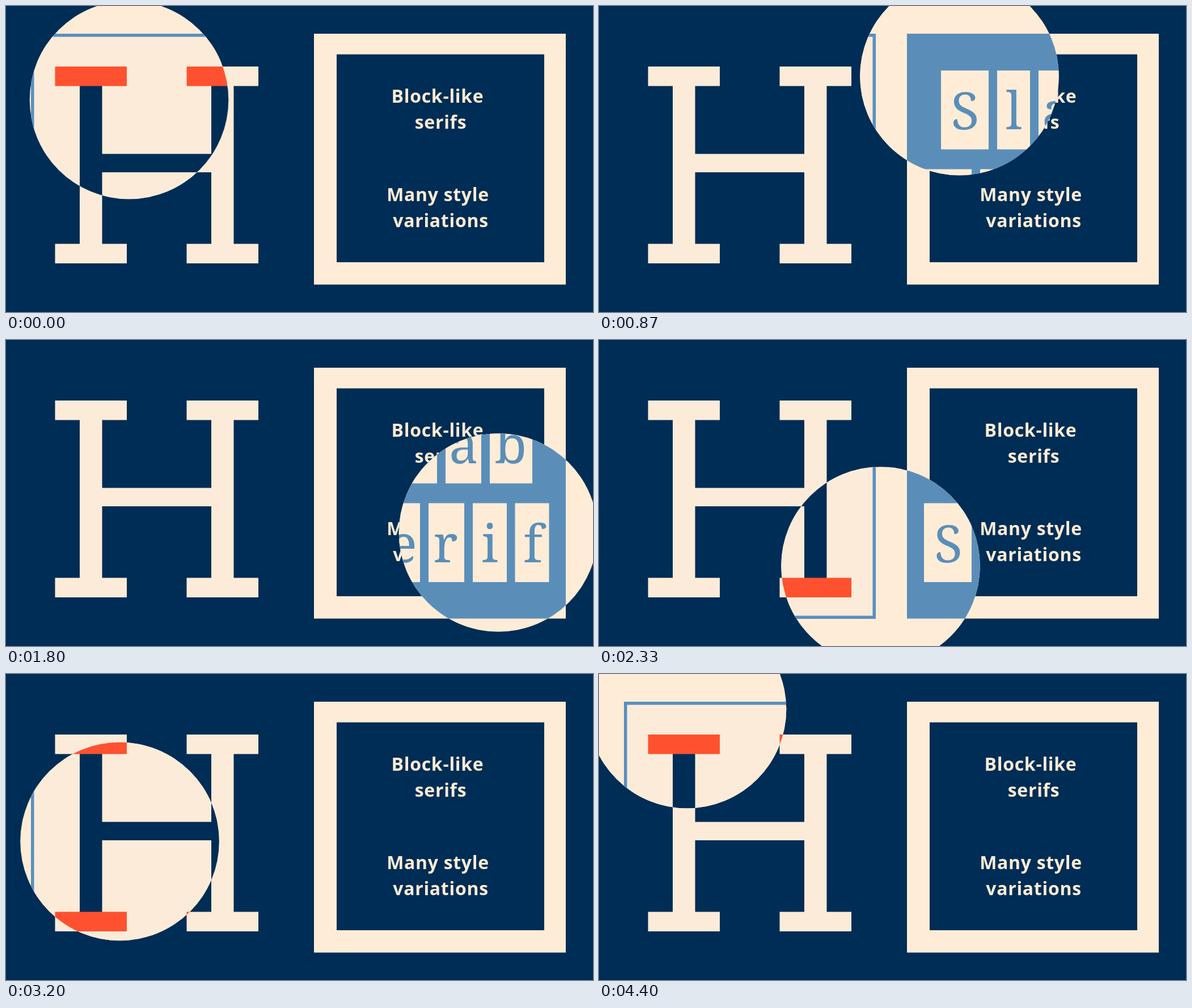
Write an HTML page that moves like this. It is 1035 by 541 pixels and loops after 4.47 s.

```html
<!DOCTYPE html>
<html lang="en">
<head>
<meta charset="utf-8">
<title>Slab serif lens</title>
<style>
  html, body { margin: 0; width: 100%; height: 100%; overflow: hidden; background: #002d55; }
  svg { display: block; width: 100%; height: 100%; }
  .label { font: 600 32px "Noto Sans", "Open Sans", sans-serif; letter-spacing: .7px; fill: #feecd6; text-anchor: middle; }
  .glyph { font: 500 92px "Noto Serif", serif; fill: #5a8eb9; text-anchor: middle; }
  .tile { fill: #feecd6; }
</style>
</head>
<body>
<svg viewBox="0 0 1035 541">
  <defs>
    <path id="stems" d="M130 141h39.5v120.5H362V141h39.5v280H362V294H169.5v127H130z"/>
    <path id="serifs" d="M86.5 107H213v34.5H86.5zM318.5 107H445v34.5H318.5zM86.5 420.5H213V455H86.5zM318.5 420.5H445V455H318.5z"/>
    <clipPath id="lens"><circle id="disc" r="175.3"/></clipPath>
  </defs>

  <rect width="1035" height="541" fill="#002d55"/>
  <g fill="#fcebd8">
    <use href="#stems"/>
    <use href="#serifs"/>
  </g>
  <path fill="#feecd6" fill-rule="evenodd" d="M543 49h444v443.5H543zM583 85.5V453h366V85.5z"/>
  <g class="label">
    <text x="761" y="170.5">Block-like</text>
    <text x="766.5" y="217">serifs</text>
    <text x="761.5" y="344.5">Many style</text>
    <text x="766.5" y="391">variations</text>
  </g>

  <g clip-path="url(#lens)">
    <rect width="1035" height="541" fill="#feecd6"/>
    <rect x="46.75" y="51.75" width="438.5" height="438.5" fill="#fcebd8" stroke="#5a8fc0" stroke-width="5.5"/>
    <use href="#stems" fill="#002d55"/>
    <use href="#serifs" fill="#ff512f"/>
    <rect x="543" y="49" width="444" height="443.5" fill="#5a8eb9"/>
    <g id="tiles"></g>
  </g>
</svg>
<script>
const LOOP = 4470, STEP = 1000 / 15;

// Each tile: letter, left, right, letter centre
const rows = [
  { top: 114, tiles: [["S", 603, 687, 645.5], ["l", 702, 760, 731.5], ["a", 775, 838, 807], ["b", 853, 928, 890]] },
  { top: 288.5, tiles: [["S", 573, 657, 616], ["e", 672, 730, 700], ["r", 745, 808, 775], ["i", 823, 883, 853], ["f", 897.5, 957.5, 929]] }
];
document.getElementById("tiles").innerHTML = rows.map(({ top, tiles }) =>
  tiles.map(([letter, left, right, centre]) =>
    `<rect class="tile" x="${left}" y="${top}" width="${right - left}" height="139.5"/>` +
    `<text class="glyph" x="${centre}" y="${top + 104}">${letter}</text>`).join("")).join("");

// Lens path: time in ms, position, velocity in px/ms
const path = [
  { t: 0,    x: 217, y: 166, vx: .4,   vy: -.1 },
  { t: 870,  x: 635.5, y: 124, vx: .5, vy: .05 },
  { t: 1800, x: 868, y: 340.5, vx: -.4,  vy: .24 },
  { t: 2330, x: 496.5, y: 399.5, vx: -.65, vy: -.15 },
  { t: 3200, x: 200.5, y: 296, vx: -.13, vy: -.12 },
  { t: 3870, x: 152, y: 187.5, vx: -.03, vy: -.2 },
  { t: 4400, x: 155, y: 62,  vx: .03,  vy: -.27 }
];

function hermite(p0, v0, p1, v1, span, s) {
  const s2 = s * s, s3 = s2 * s, blend = 3 * s2 - 2 * s3;
  return p0 + (p1 - p0) * blend + span * (v0 * (s3 - 2 * s2 + s) + v1 * (s3 - s2));
}

function lensAt(time) {
  let i = 0;
  while (i < path.length - 2 && time >= path[i + 1].t) i++;
  const a = path[i], b = path[i + 1], span = b.t - a.t;
  const s = Math.min(1, (time - a.t) / span);
  return [hermite(a.x, a.vx, b.x, b.vx, span, s), hermite(a.y, a.vy, b.y, b.vy, span, s)];
}

const disc = document.getElementById("disc");

function draw(now) {
  // 15 pictures a second, each starting on a 10 ms tick
  const tick = Math.floor((now % LOOP) / 10) * 10;
  const time = Math.round(Math.floor((tick + 3.4) / STEP) * STEP / 10) * 10;
  const [x, y] = lensAt(time);
  disc.setAttribute("cx", x);
  disc.setAttribute("cy", y);
}

const start = performance.now();
function loop() {
  draw(performance.now() - start);
  requestAnimationFrame(loop);
}
loop();
</script>
</body>
</html>
```
